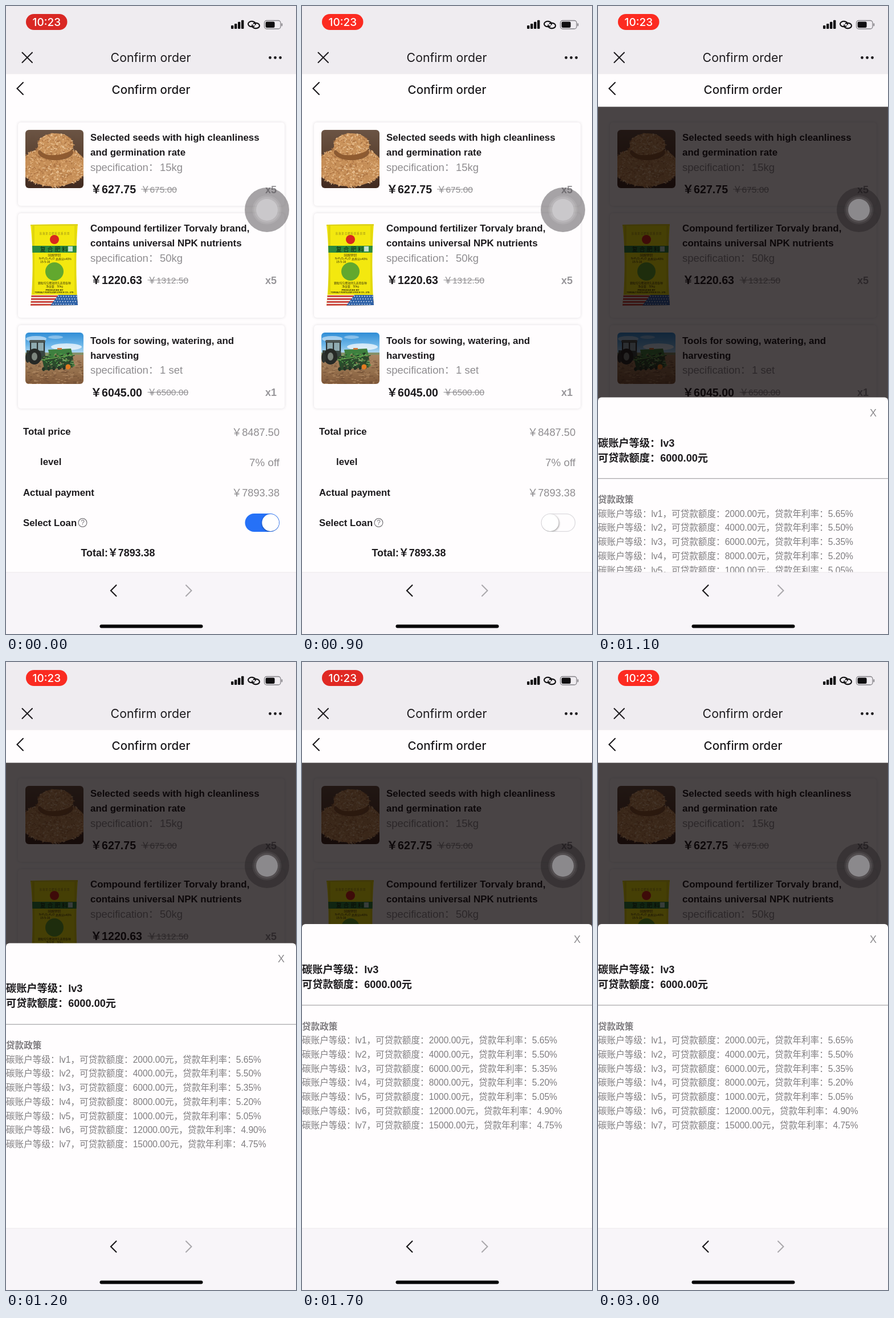
These frames come from a looping animation (509 px wide and 1100 px high, 3100 ms). An HTML page with a canvas:

```html
<!DOCTYPE html>
<html lang="zh-CN">
<head>
<meta charset="utf-8">
<title>Confirm order</title>
<style>
html, body { margin: 0; width: 100%; height: 100%; overflow: hidden; background: #fffdfe; }
canvas { display: block; width: 509px; height: 1100px; }
</style>
</head>
<body>
<canvas id="stage"></canvas>
<script>
const W = 509, H = 1100, LOOP = 3100, STEP = 100;
const CJK = '"Noto Sans CJK SC", "Noto Sans CJK", sans-serif';
const BODY = '"Liberation Sans", ' + CJK;
const UI = 'Inter, ' + BODY;
const INK = '#1d1b1e', GRAY = '#8f8d90', PAGE = '#fffdfe';

const canvas = document.getElementById('stage');
const ctx = canvas.getContext('2d');
const dpr = window.devicePixelRatio || 1;
canvas.width = W * dpr;
canvas.height = H * dpr;

const clamp = v => Math.max(0, Math.min(1, v));
const mix = (a, b, p) => a + (b - a) * p;
const mixRgb = (a, b, p) => `rgb(${a.map((v, i) => Math.round(mix(v, b[i], p)))})`;

function random(seed) {
  return () => (seed = (seed * 16807) % 2147483647) / 2147483647;
}

// y is the middle of the capital letters
function text(str, x, y, size, color = INK, weight = 400, align = 'left', font = BODY) {
  ctx.font = `${weight} ${size}px ${font}`;
  ctx.textAlign = align;
  ctx.fillStyle = color;
  ctx.fillText(str, x, y + size * 0.36);
}

function box(x, y, w, h, r, color) {
  ctx.beginPath();
  ctx.roundRect(x, y, w, h, r);
  ctx.fillStyle = color;
  ctx.fill();
}

function rect(x, y, w, h, color) {
  ctx.fillStyle = color;
  ctx.fillRect(x, y, w, h);
}

function disc(x, y, r, color, ry = r) {
  ctx.beginPath();
  ctx.ellipse(x, y, r, ry, 0, 0, 7);
  ctx.fillStyle = color;
  ctx.fill();
}

function ring(x, y, r, color, width) {
  ctx.beginPath();
  ctx.arc(x, y, r, 0, 7);
  ctx.strokeStyle = color;
  ctx.lineWidth = width;
  ctx.stroke();
}

function trace(pts) {
  ctx.beginPath();
  for (let i = 0; i < pts.length; i += 2) ctx.lineTo(pts[i], pts[i + 1]);
}

function line(pts, color, width) {
  trace(pts);
  ctx.strokeStyle = color;
  ctx.lineWidth = width;
  ctx.stroke();
}

function poly(pts, color) {
  trace(pts);
  ctx.fillStyle = color;
  ctx.fill();
}

function gradient(y0, y1, ...colors) {
  const g = ctx.createLinearGradient(0, y0, 0, y1);
  colors.forEach((c, i) => g.addColorStop(i / (colors.length - 1), c));
  return g;
}

function clipped(x, y, w, h, r, draw) {
  ctx.save();
  ctx.beginPath();
  ctx.roundRect(x, y, w, h, r);
  ctx.clip();
  draw();
  ctx.restore();
}

function grains(rnd, count, cx, cy, rx, ry) {
  const tones = ['#e0ae78', '#d39c64', '#c48b54', '#e9c294', '#a97142'];
  for (let i = 0; i < count; i++) {
    const a = rnd() * 6.283, d = Math.sqrt(rnd());
    const x = cx + Math.cos(a) * d * rx, y = cy + Math.sin(a) * d * ry;
    const turn = rnd() * 3.14, dx = Math.cos(turn) * 1.8, dy = Math.sin(turn) * 1.4;
    line([x - dx, y - dy, x + dx, y + dy], tones[Math.floor(rnd() * 5)], 1.5);
  }
}

function seedsPhoto() {
  clipped(34, 217, 102, 102, 6, () => {
    rect(34, 217, 102, 102, gradient(217, 319, '#6b5444', '#59402f', '#402a20'));
    const rnd = random(77);
    disc(84, 281, 57, '#c68f58', 35);
    grains(rnd, 750, 84, 281, 58, 37);
    disc(87, 256, 31, '#8a5a33', 14);
    disc(87, 243, 31, '#c9935c', 20);
    grains(rnd, 300, 87, 243, 32, 20);
    ctx.beginPath();
    ctx.moveTo(57, 256);
    ctx.quadraticCurveTo(86, 268, 115, 253);
    ctx.quadraticCurveTo(106, 270, 84, 270);
    ctx.quadraticCurveTo(65, 269, 57, 256);
    ctx.fillStyle = '#8f5b30';
    ctx.fill();
  });
}

function bagPhoto() {
  ctx.save();
  ctx.beginPath();
  ctx.moveTo(43, 383);
  ctx.lineTo(126, 382);
  ctx.bezierCurveTo(122.5, 425, 122.5, 480, 126, 524);
  ctx.lineTo(43, 525);
  ctx.bezierCurveTo(48, 480, 48, 425, 43, 383);
  ctx.clip();
  rect(40, 380, 90, 148, '#f3e80f');
  rect(40, 380, 90, 5, '#ddd21a');
  rect(46, 385, 4, 120, 'rgba(140,130,0,.18)');
  rect(120, 385, 4, 120, 'rgba(140,130,0,.15)');
  text('高 效 复 合 肥 料 优 质 农 用', 85, 398, 4.2, '#8d8118', 400, 'center');
  disc(85, 409, 8, '#d8271d');
  rect(40, 420, 90, 12, '#2c8a3f');
  rect(109, 421, 8, 9, '#bfe0d0');
  text('复 合 肥 料', 84, 426, 10, '#10260f', 400, 'center');
  text('[硫酸钾型]', 85, 436, 5, '#52400c', 400, 'center');
  text('N-P₂O₅-K₂O', 58, 442, 5, '#33300c');
  text('15-5-16', 60, 448, 5, '#33300c');
  text('总养分≥40%', 87, 443, 5, '#33300c');
  disc(85, 465, 16, '#62a82e');
  text('颗粒均匀肥效持久适用各种', 85, 485, 4.8, '#3a370c', 400, 'center');
  text('净含量：50kg', 85, 491, 4.8, '#3a370c', 400, 'center');
  text('PRODUCED BY', 85, 497, 4.2, '#24220a', 700, 'center');
  text('TORVALY FERTILIZER STOCK CO., LTD.', 85, 502, 3.6, '#24220a', 700, 'center');
  rect(40, 506, 90, 20, '#f3ebe7');
  for (let i = 0; i < 4; i++) rect(40, 507 + i * 5, 90, 2.7, '#c73932');
  poly([92, 506, 130, 506, 130, 526, 77, 526], '#2f62a7');
  for (let r = 0; r < 4; r++)
    for (let c = 0; c < 9; c++) disc(92 + c * 4.5 - r * 3, 508.5 + r * 4.6, 0.9, '#e6edf6');
  ctx.restore();
}

function tractorPhoto() {
  clipped(34, 572, 102, 90, 6, () => {
    rect(34, 572, 102, 45, gradient(572, 615, '#2f8dd6', '#6db6e8', '#d4e9f4'));
    disc(53, 583, 18, 'rgba(255,255,255,.5)', 5);
    disc(106, 597, 27, 'rgba(255,255,255,.7)', 6);
    disc(87, 580, 13, 'rgba(255,255,255,.35)', 3);
    rect(34, 607, 102, 5, '#84916a');
    rect(34, 611, 102, 51, gradient(611, 662, '#a98563', '#98734f', '#80593a'));
    const rnd = random(31);
    for (let i = 0; i < 170; i++)
      rect(34 + rnd() * 102, 620 + rnd() * 42, 2 + rnd() * 4, 1, rnd() < 0.5 ? '#b7906a' : '#6d4c34');

    box(41, 585, 28, 5, 2, '#4c5553');
    rect(43, 590, 24, 16, '#8fabb1');
    [42, 54, 66].forEach(x => rect(x, 589, 2.2, 18, '#2b3232'));
    poly([36, 603, 68, 604, 70, 621, 36, 621], '#394641');
    disc(50, 614, 12, '#262926', 14);
    disc(50, 614, 5, '#7c857d', 7);
    disc(38, 616, 4, '#2d322e', 9);

    poly([62, 614, 116, 608, 120, 631, 68, 638], '#2b4a2c');
    poly([74, 602, 114, 600, 117, 612, 77, 616], '#3e803f');
    const greens = ['#4f9a48', '#24562a', '#1d2b1e', '#73a862', '#8b7452'];
    for (let i = 0; i < 110; i++) {
      const x = 62 + rnd() * 55, y = 612 + rnd() * 25 - (x - 62) * 0.08;
      const dx = 1 + rnd() * 4;
      line([x, y, x + dx, y + (rnd() - 0.5) * 6], greens[Math.floor(rnd() * 5)], 1.5);
    }
    for (let x = 66; x < 118; x += 9) disc(x, 636 - (x - 66) * 0.07, 2.5, '#263426', 3.5);
    line([62, 620, 118, 611], '#65a54d', 1.5);
    rect(90, 599, 8, 3, '#c9783a');
    disc(109, 632, 4.5, '#e27b22');
  });
}

function card(y, h) {
  ctx.save();
  ctx.shadowColor = 'rgba(60,55,70,.16)';
  ctx.shadowBlur = 5 * dpr;
  box(21, y, 468, h, 5, PAGE);
  ctx.restore();
}

function item(y, title, spec, price, old, oldX, count) {
  title.forEach((s, i) => text(s, 148, y + i * 26, 16.9, INK, 700));
  text('specification：', 148, y + 52, 18.5, GRAY);
  text(spec, 270, y + 52, 18.5, GRAY);
  text('￥' + price, 148.5, y + 91, 19.6, INK, 700);
  text('￥' + old, oldX, y + 91, 15.5, GRAY);
  line([oldX, y + 91, oldX + ctx.measureText('￥' + old).width, y + 91], GRAY, 1.2);
  text(count, 475, y + 91.5, 18, '#98969a', 700, 'right');
}

function toggle(p) {
  box(419.5, 889, 60.5, 32, 16, mixRgb([38, 113, 247], [220, 218, 222], p));
  box(420.8, 890.3, 57.9, 29.4, 14.7, mixRgb([38, 113, 247], [255, 253, 254], p));
  clipped(420, 889.5, 59.5, 31, 15.5, () => {
    ctx.shadowColor = 'rgba(0,0,0,.4)';
    ctx.shadowBlur = 3 * dpr;
    ctx.shadowOffsetX = p * dpr;
    ctx.shadowOffsetY = dpr;
    disc(mix(464.3, 435.5, p), 905, 15, '#fff');
  });
}

function page(off) {
  card(204, 146);
  card(363, 183);
  card(559, 146);
  seedsPhoto();
  bagPhoto();
  tractorPhoto();
  item(230, ['Selected seeds with high cleanliness', 'and germination rate'],
    '15kg', '627.75', '675.00', 237, 'x5');
  item(389, ['Compound fertilizer Torvaly brand,', 'contains universal NPK nutrients'],
    '50kg', '1220.63', '1312.50', 248.5, 'x5');
  item(585.5, ['Tools for sowing, watering, and', 'harvesting'],
    '1 set', '6045.00', '6500.00', 248.5, 'x1');

  text('Total price', 30, 745, 16.8, INK, 700);
  text('level', 60, 798, 16.8, INK, 700);
  text('Actual payment', 30, 852, 16.8, INK, 700);
  text('Select Loan', 30, 905, 16.8, INK, 700);
  text('￥8487.50', 480, 746, 18.2, GRAY, 400, 'right');
  text('7% off', 480, 799, 18.8, GRAY, 400, 'right');
  text('￥7893.38', 480, 852.5, 18.2, GRAY, 400, 'right');
  ring(134.5, 905, 7.4, '#77757a', 1.2);
  text('?', 134.5, 905, 12, '#77757a', 400, 'center');
  toggle(off);
}

function sheet(y) {
  ctx.save();
  ctx.beginPath();
  ctx.rect(0, 177, W, 815);
  ctx.clip();
  box(0, y, W, 560, [6, 6, 0, 0], PAGE);
  text('X', 483, y + 27, 18, '#8b898c', 400, 'center');
  text('碳账户等级：lv3', 0, y + 79.5, 18.2, INK, 700);
  text('可贷款额度：6000.00元', 0, y + 105.5, 18.2, INK, 700);
  line([0, y + 142.2, W, y + 142.2], '#a9a7aa', 1.2);
  text('贷款政策', 0, y + 179, 15.6, '#7e7c7f', 700);
  const limits = [2000, 4000, 6000, 8000, 1000, 12000, 15000];
  limits.forEach((n, i) => {
    const rate = (5.65 - i * 0.15).toFixed(2);
    text(`碳账户等级：lv${i + 1}，可贷款额度：${n}.00元，贷款年利率：${rate}%`,
      0, y + 203.5 + i * 24.75, 15.6, '#7e7c7f');
  });
  ctx.restore();
}

function touchBall(dark) {
  const layers = dark
    ? ['rgba(20,17,20,.32)', 'rgba(255,255,255,.06)', 'rgba(255,255,255,.08)', '#8b898c']
    : ['rgba(70,66,70,.48)', 'rgba(255,255,255,.1)', 'rgba(255,255,255,.12)', '#cac8cb'];
  [39, 25.5, 22.5, 19].forEach((r, i) => disc(458, 357, r, layers[i]));
}

function chrome(t) {
  rect(0, 0, W, 119.5, '#efecf0');
  const glow = 0.5 - 0.5 * Math.cos(Math.PI * t / 1000);
  box(35, 14, 72.5, 28, 14, mixRgb([217, 40, 36], [253, 43, 33], glow));
  text('10:23', 71.3, 28, 19, '#fff', 500, 'center', UI);

  for (let i = 0; i < 4; i++) {
    const h = 6 + i * 3.1;
    box(395 + i * 6, 40 - h, 4.4, h, 1, '#100f11');
  }
  ctx.lineCap = 'round';
  ctx.strokeStyle = '#100f11';
  ctx.lineWidth = 2.1;
  ctx.beginPath();
  ctx.ellipse(431.5, 31.5, 6.5, 4.7, 0, 0.9, 6.5);
  ctx.stroke();
  ctx.beginPath();
  ctx.ellipse(438.5, 34.5, 6.5, 4.7, 0, -2.2, 3.4);
  ctx.stroke();
  ctx.beginPath();
  ctx.roundRect(453.5, 25.5, 28.5, 14.5, 4);
  ctx.strokeStyle = '#838186';
  ctx.lineWidth = 1.3;
  ctx.stroke();
  box(455.6, 27.6, 16, 10.3, 2.2, '#100f11');
  box(483.4, 30.3, 1.8, 5, 1, '#838186');

  line([28.5, 81.5, 46, 99], INK, 2);
  line([46, 81.5, 28.5, 99], INK, 2);
  text('Confirm order', 254, 90, 21.3, INK, 400, 'center', UI);
  [463.5, 472.5, 481.5].forEach(x => disc(x, 90.5, 2.4, INK));

  rect(0, 119.5, W, 57, PAGE);
  line([30, 134, 19.5, 144.5, 30, 155], INK, 2.1);
  text('Confirm order', 254.5, 147, 20.6, INK, 500, 'center', UI);

  rect(0, 992, W, 108, '#f8f5f9');
  rect(0, 991.5, W, 1, '#ebe8ec');
  line([193.5, 1014.5, 184, 1024, 193.5, 1033.5], INK, 2.2);
  line([316, 1014.5, 325.5, 1024, 316, 1033.5], '#a9a7ab', 2);
  box(164.5, 1083.5, 181, 6, 3, '#080709');
  ctx.lineCap = 'butt';
}

function draw(t) {
  ctx.setTransform(dpr, 0, 0, dpr, 0, 0);
  rect(0, 0, W, H, PAGE);
  const dark = t >= 1000;
  page(1 - (1 - clamp((t - 200) / 300)) ** 2);
  if (dark) rect(0, 176, W, 749, 'rgba(6,0,2,.73)');
  rect(0, 924, W, 68, PAGE);
  text('Total:￥7893.38', t < 300 ? 131.5 : 122.5, 958, 17.9, INK, 700);
  touchBall(dark);
  const rest = (1 - clamp((t - 1030) / 282)) ** 3;
  if (rest < 1) sheet(459 + 533 * rest);
  chrome(t);
}

let shown = -1;
function frame(now) {
  const t = Math.floor((now % LOOP) / STEP) * STEP;
  if (t !== shown) draw(shown = t);
  requestAnimationFrame(frame);
}
draw(0);
requestAnimationFrame(frame);
</script>
</body>
</html>
```
